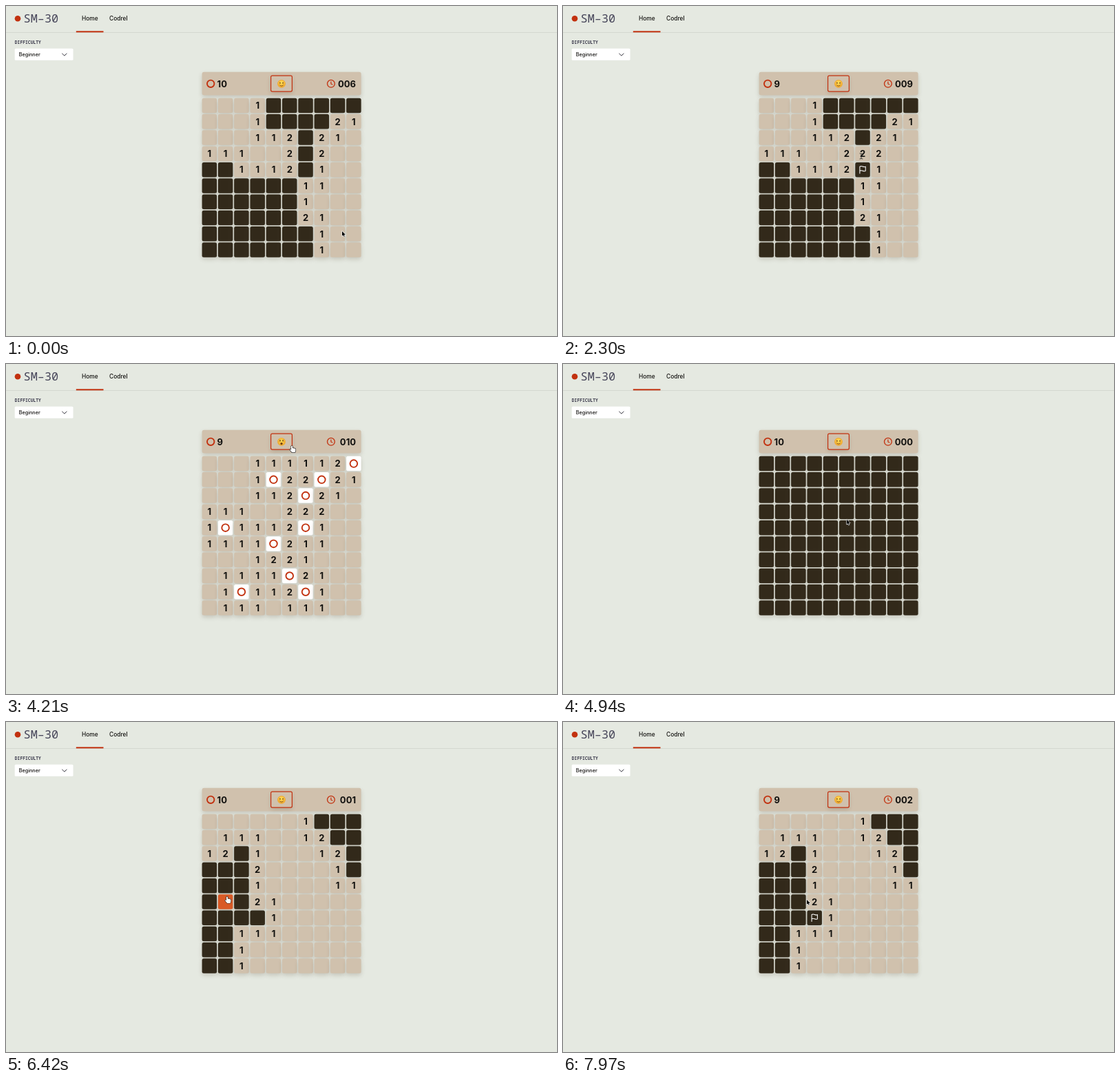
Recreate the animation shown at these times as an HTML page with a canvas. Size 800 by 479 pixels, loop 8000 ms.

```html
<!DOCTYPE html>
<html lang="en">
<head>
<meta charset="utf-8">
<title>Minesweeper</title>
<style>
  html, body { margin: 0; width: 100%; height: 100%; overflow: hidden; background: #e5e9e1; }
  canvas { display: block; }
</style>
</head>
<body>
<canvas id="stage" width="800" height="479"></canvas>
<script>
const ctx = document.getElementById('stage').getContext('2d');
const LOOP = 8000;
const BG = '#e5e9e1', TAN = '#d0c1ad', DARK = '#32291a', RED = '#c2310f', HOT = '#d95a26', INK = '#12110f';
const LEFT = 284.6, TOP = 133.8, PITCH = 23.28, SIZE = 21.5;

// '#' closed, '.' empty, '*' mine, 'F' flag
const FIRST = ['...1######', '...1####21', '...112#21.', '111..2#2..', '##1112#1..',
               '######11..', '######1...', '######21..', '#######1..', '#######1..'];
const LOST = ['...111112*', '...1*22*21', '...112*21.', '111..222..', '1*1112*1..',
              '1111*211..', '...1221...', '.1111*21..', '.1*112*1..', '.111.111..'];
const SECOND = ['......1###', '.111..12##', '12#1...12#', '###2....1#', '###1....11',
                '###21.....', '####1.....', '##111.....', '##1.......', '##1.......'];
const CLOSED = Array(10).fill('#'.repeat(10));

const FLAG_1 = 1300, OPEN_1 = 1900, LOSE = 3340, RESET = 4420, OPEN_2 = 5300, FLAG_2 = 7450;

// time, x, y of the pointer
const PATH = [
  [0, 488, 327], [790, 436, 235], [1350, 436, 235], [1720, 433, 218], [2420, 433, 218],
  [2900, 435, 191], [3400, 435, 191], [4150, 415, 119], [4480, 415, 119], [5150, 411, 258],
  [5350, 411, 258], [5880, 316, 203], [5920, 316, 203], [6700, 323, 274.5], [7100, 323, 274.5],
  [7350, 365, 282], [7550, 365, 282], [7940, 354, 258], [8000, 354, 258]
];

const flagIcon = new Path2D('M4 15s1-1 4-1 5 2 8 2 4-1 4-1V3s-1 1-4 1-5-2-8-2-4 1-4 1zM4 22v-7');
const arrowIcon = new Path2D('M0 0V7.2L1.7 5.7 2.8 8.2 4 7.7 2.9 5.2H5.2Z');
const handIcon = new Path2D('M-.9 .3Q0-.7 .9 .3V3.2Q1.8 2.6 2.6 3.4 3.5 2.9 4.2 3.8 5.4 3.5 5.4 5V7L4.6 9.3H.2L-2.8 5.6Q-2.9 4.4-1.7 4.9L-.9 5.5Z');
const beamIcon = new Path2D('M-2-4Q0-4 0-3Q0-4 2-4M0-3V3M-2 4Q0 4 0 3Q0 4 2 4');

function box(x, y, w, h, r, fill, shadow) {
  ctx.save();
  if (shadow) {
    ctx.shadowColor = 'rgba(70,55,35,.2)';
    ctx.shadowBlur = 6;
    ctx.shadowOffsetY = 3;
  }
  ctx.beginPath();
  ctx.roundRect(x, y, w, h, r);
  ctx.fillStyle = fill;
  ctx.fill();
  ctx.restore();
}

function text(str, x, y, font, color = INK, align = 'left') {
  ctx.font = font;
  ctx.fillStyle = color;
  ctx.textAlign = align;
  ctx.fillText(str, x, y);
}

function disc(x, y, r, fill) {
  ctx.beginPath();
  ctx.arc(x, y, r, 0, 7);
  ctx.fillStyle = fill;
  ctx.fill();
}

function ring(x, y, r, width) {
  ctx.beginPath();
  ctx.arc(x, y, r, 0, 7);
  ctx.strokeStyle = RED;
  ctx.lineWidth = width;
  ctx.stroke();
}

function line(points, color, width) {
  ctx.beginPath();
  points.forEach(([x, y]) => ctx.lineTo(x, y));
  ctx.strokeStyle = color;
  ctx.lineWidth = width;
  ctx.stroke();
}

function pointerAt(t) {
  const i = PATH.findIndex(p => p[0] > t);
  const [t0, x0, y0] = PATH[i - 1], [t1, x1, y1] = PATH[i];
  const u = (t - t0) / (t1 - t0), e = u * u * (3 - 2 * u);
  return { x: x0 + (x1 - x0) * e, y: y0 + (y1 - y0) * e };
}

function cellAt(t, row, col) {
  if (t < LOSE) {
    if (col === 6 && row === 4 && t >= FLAG_1) return 'F';
    if (col === 6 && row === 3 && t >= OPEN_1) return '2';
    return FIRST[row][col];
  }
  if (t >= FLAG_2 && col === 3 && row === 6) return 'F';
  return (t < RESET ? LOST : t < OPEN_2 ? CLOSED : SECOND)[row][col];
}

function secondsAt(t) {
  if (t < RESET) return Math.min(10, 6 + Math.floor((t + 800) / 1000));
  return Math.max(0, Math.floor((t - OPEN_2) / 1000));
}

function drawPage() {
  ctx.fillStyle = BG;
  ctx.fillRect(0, 0, 800, 479);
  line([[0, 38.5], [800, 38.5]], '#d3d7cf', 1);
  disc(17, 18.3, 4.3, RED);
  text('SM–30', 25.5, 24, '300 16.9px "Noto Sans Mono", monospace', '#47465a');
  text('Home', 110, 21.3, '500 8.4px Inter, sans-serif');
  text('Codrel', 150, 21.3, '500 8.4px Inter, sans-serif');
  ctx.fillStyle = RED;
  ctx.fillRect(101.8, 36.3, 39.7, 2);
  text('DIFFICULTY', 12.8, 54.9, '600 6.35px "Noto Sans Mono", monospace', '#3d3c4e');
  box(12.7, 61.8, 84.8, 17, 1.5, '#fff');
  text('Beginner', 18.8, 73, '500 7.2px Inter, sans-serif');
  line([[81.3, 68.8], [84.8, 72.2], [88.3, 68.8]], '#33323c', 1);
}

function drawFace(lost) {
  const brown = '#6b3d12', x = 400, y = 112.8;
  const glow = ctx.createRadialGradient(x, y - 2, 1, x, y, 6);
  glow.addColorStop(0, '#ffdc55');
  glow.addColorStop(1, '#eea32a');
  disc(x, y, 5.9, glow);
  for (const ex of [x - 2.1, x + 2.1]) {
    if (lost) {
      line([[ex - 1.2, y - 2.6], [ex + 1.2, y - .4]], brown, .8);
      line([[ex + 1.2, y - 2.6], [ex - 1.2, y - .4]], brown, .8);
    } else {
      disc(ex, y - 1.1, .85, brown);
    }
  }
  if (lost) return disc(x, y + 2.8, 1.6, brown);
  ctx.beginPath();
  ctx.arc(x, y + .3, 3, .5, Math.PI - .5);
  ctx.strokeStyle = brown;
  ctx.lineWidth = .8;
  ctx.stroke();
}

function drawPanel(t) {
  const bold = '700 13px Inter, sans-serif';
  const flagged = (t >= FLAG_1 && t < RESET) || t >= FLAG_2;
  box(LEFT, 95.8, 231, 33.6, 3, TAN, true);
  ring(297.2, 112.8, 5.2, 1.9);
  text(flagged ? '9' : '10', 306.6, 117.5, bold);
  box(384.6, 101.2, 30.8, 22.9, 2, TAN, true);
  ctx.beginPath();
  ctx.roundRect(384.6, 101.2, 30.8, 22.9, 2);
  ctx.strokeStyle = RED;
  ctx.lineWidth = 1.2;
  ctx.stroke();
  drawFace(t >= LOSE && t < RESET);
  ring(471.9, 112.8, 5.4, 1.3);
  line([[471.9, 109.5], [471.9, 113], [474.3, 114.2]], RED, 1.2);
  text(String(secondsAt(t)).padStart(3, '0'), 508, 117.5, bold, INK, 'right');
}

function drawIcon(icon, x, y, scale, stroke, width, fill) {
  ctx.save();
  ctx.translate(x, y);
  ctx.scale(scale, scale);
  ctx.lineJoin = ctx.lineCap = 'round';
  ctx.strokeStyle = stroke;
  ctx.lineWidth = width;
  ctx.stroke(icon);
  if (fill) {
    ctx.fillStyle = fill;
    ctx.fill(icon);
  }
  ctx.restore();
}

// Draws all cells and returns the pointer shape for what lies under it.
function drawBoard(t, { x: px, y: py }) {
  let shape = Math.abs(px - 400) < 16 && Math.abs(py - 112.6) < 12 ? 'hand' : 'arrow';
  for (let row = 0; row < 10; row++) {
    for (let col = 0; col < 10; col++) {
      const x = LEFT + col * PITCH, y = TOP + row * PITCH;
      const cx = x + SIZE / 2, cy = y + SIZE / 2;
      const kind = cellAt(t, row, col);
      const closed = kind === '#' || kind === 'F';
      const over = px >= x && px < x + SIZE && py >= y && py < y + SIZE;
      if (over && closed) shape = 'hand';
      box(x, y, SIZE, SIZE, 2.5, closed ? (over ? HOT : DARK) : kind === '*' ? '#fff' : TAN, true);
      if (kind === 'F') drawIcon(flagIcon, cx - 6.2, cy - 6.2, .52, '#fff', 2);
      else if (kind === '*') ring(cx, cy, 5.3, 1.9);
      else if (kind > '0') {
        text(kind, cx, cy + 4.8, '700 13px Inter, sans-serif', INK, 'center');
        if (Math.abs(px - cx) < 5 && Math.abs(py - cy) < 8) shape = 'beam';
      }
    }
  }
  return shape;
}

function drawPointer(shape, { x, y }) {
  if (shape === 'hand') drawIcon(handIcon, x, y, 1, '#2a2a2a', 1.3, '#fff');
  else if (shape === 'beam') drawIcon(beamIcon, x, y, 1, '#222', .8);
  else drawIcon(arrowIcon, x, y, .95, '#fff', 1.2, '#000');
}

function frame(now) {
  const t = now % LOOP, pointer = pointerAt(t);
  drawPage();
  drawPanel(t);
  drawPointer(drawBoard(t, pointer), pointer);
  requestAnimationFrame(frame);
}
requestAnimationFrame(frame);
</script>
</body>
</html>
```
